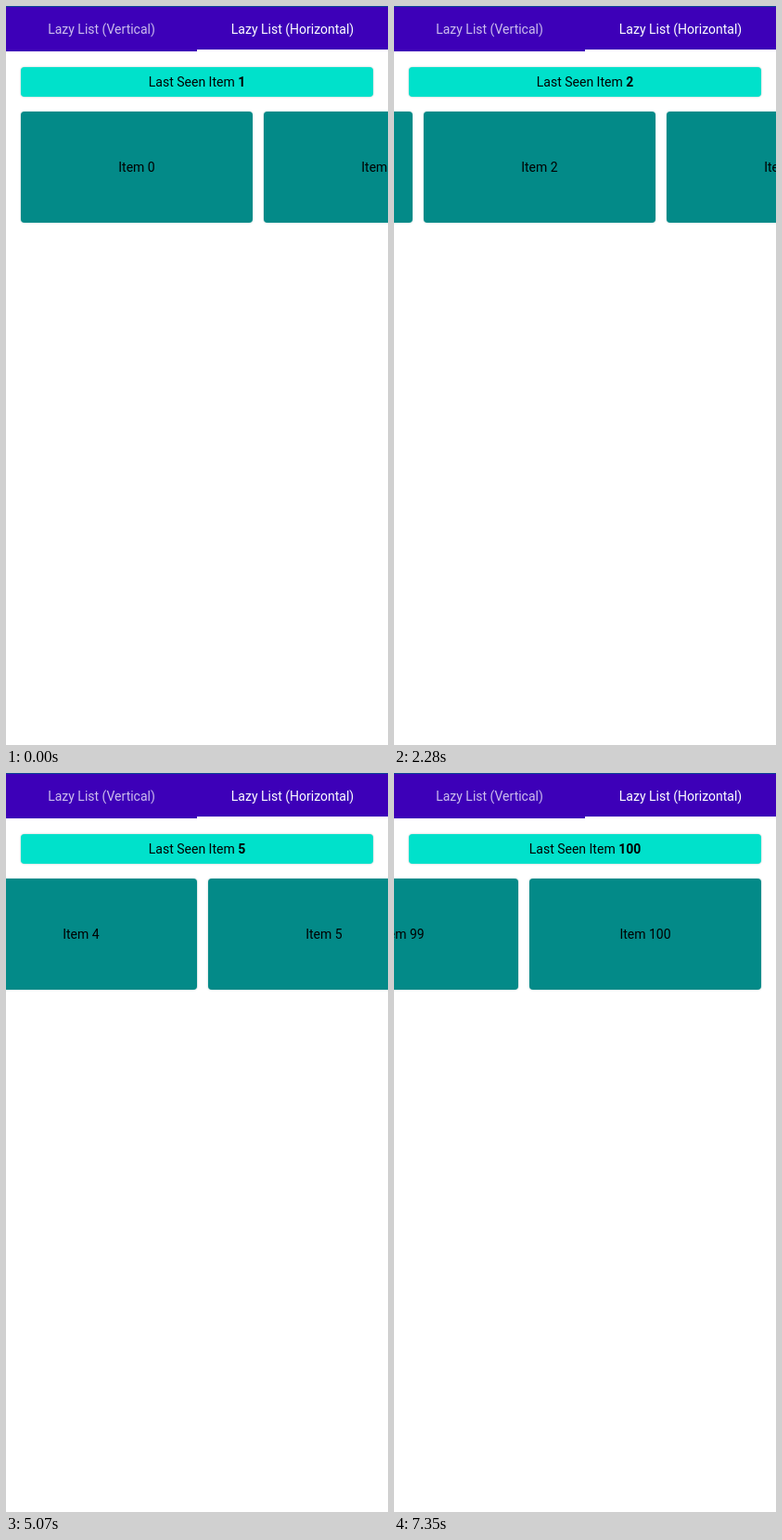
Recreate the animation shown at these times as an HTML page. Size 412 px wide and 798 px high, loop 9.21 s.

```html
<!DOCTYPE html>
<html lang="en">
<head>
<meta charset="utf-8">
<title>Lazy list</title>
<style>
  html, body { margin: 0; width: 100%; height: 100%; overflow: hidden; background: #fff; }
  body { position: relative; font: 14px Roboto, sans-serif; color: #000; }
  div { position: absolute; box-sizing: border-box; text-align: center; white-space: pre; }
  .tabs { left: 0; top: 0; width: 412px; height: 49px; background: #3d00b8; border-top: 1px solid #0b4495; }
  .tab { top: 0; width: 206px; height: 48px; line-height: 48px; color: rgba(255, 255, 255, .74); }
  .active { left: 206px; color: #fff; border-bottom: 2px solid #fff; }
  .seen, .card { border-radius: 4px; box-shadow: 0 0 2px rgba(0, 90, 85, .4); }
  .seen { left: 16px; top: 66px; width: 380px; height: 32px; line-height: 32px; background: #00e1cb; }
  .card { left: 0; top: 114px; width: 250px; height: 120px; line-height: 120px; background: #038a88; }
</style>
</head>
<body>
<div class="tabs">
  <div class="tab">Lazy List (Vertical)</div>
  <div class="tab active">Lazy List (Horizontal)</div>
</div>
<div class="seen">Last Seen Item <b id="last">1</b></div>
<div class="card"></div>
<div class="card"></div>
<div class="card"></div>
<script>
const LOOP = 9210, FRAME = 30, PITCH = 262, PAD = 16, LAST = 100, MAX_SCROLL = 26070;
const cards = document.querySelectorAll('.card');
const lastSeen = document.getElementById('last');

// cubic-bezier(.4, 0, .2, 1)
function ease(x) {
  if (x <= 0) return 0;
  if (x >= 1) return 1;
  let lo = 0, hi = 1;
  for (let i = 0; i < 30; i++) {
    const u = (lo + hi) / 2, v = 1 - u;
    if (1.2 * u * v * v + .6 * u * u * v + u * u * u < x) lo = u; else hi = u;
  }
  return lo * lo * (3 - 2 * lo);
}

// Six short scrolls, then one very long scroll that hits the end of the list
function scrollAt(t) {
  let s = 169278 * ease((t - 5844) / 7000);
  for (let i = 0; i < 6; i++) s += 200 * ease((t - 255 - 930 * i) / 450);
  return Math.min(s, MAX_SCROLL);
}

function draw(t) {
  const s = scrollAt(t);
  const first = Math.max(0, Math.floor((s - PAD) / PITCH));
  cards.forEach((card, i) => {
    const item = first + i;
    card.hidden = item > LAST;
    card.style.left = PAD + item * PITCH - s + 'px';
    card.textContent = 'Item ' + item;
  });
  // An item counts once half of it is visible; the label trails by one frame
  lastSeen.textContent = Math.min(LAST, Math.floor((scrollAt(t - FRAME) + 271) / PITCH));
}

const start = performance.now();
function tick() {
  const t = (performance.now() - start) % LOOP;
  draw(Math.floor(t / FRAME) * FRAME);
  requestAnimationFrame(tick);
}
tick();
</script>
</body>
</html>
```
